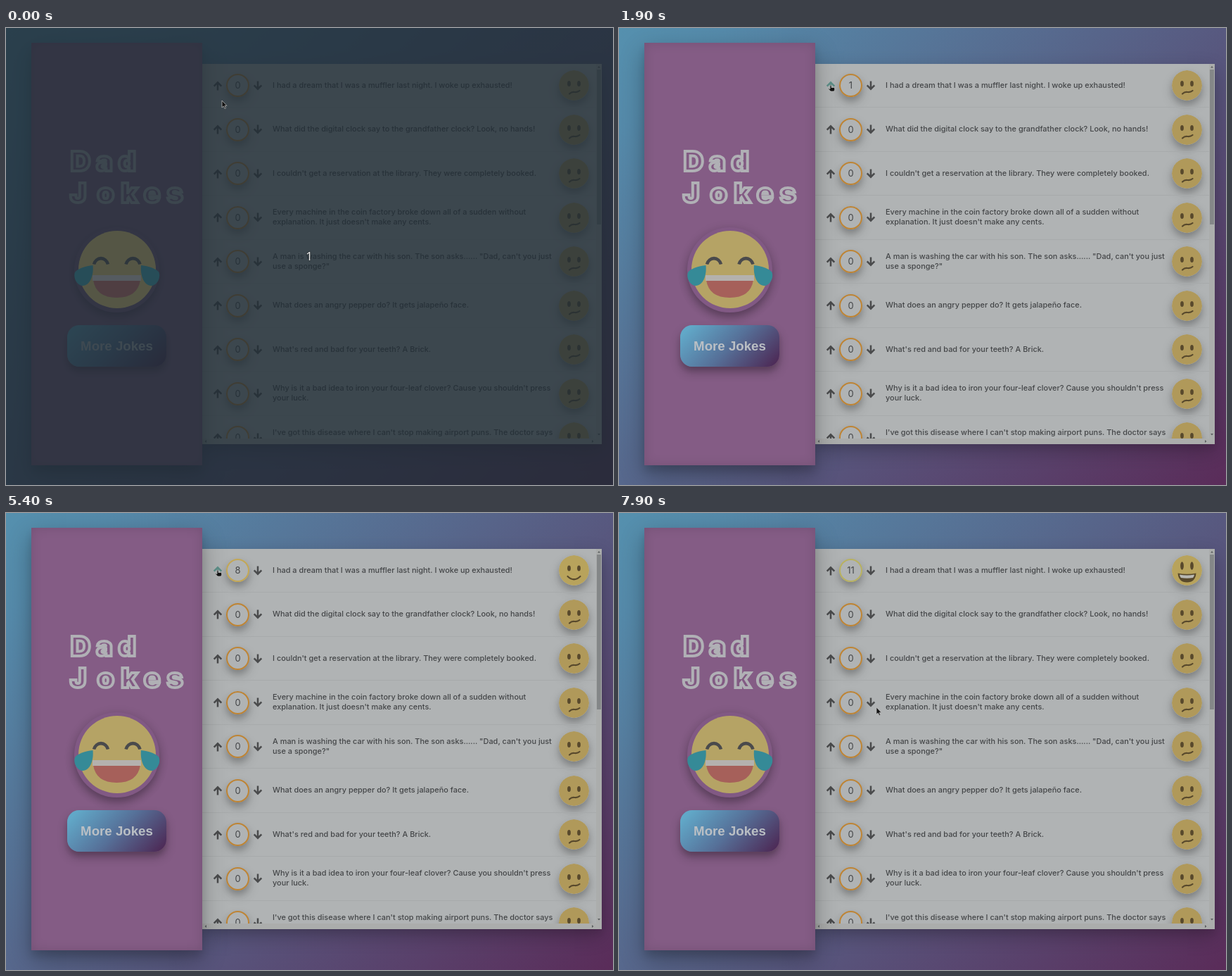
Write an HTML page that moves like this. It is 863 px wide and 649 px high and loops after 8000 ms.

```html
<!DOCTYPE html>
<html lang="en">
<head>
<meta charset="utf-8">
<title>Dad Jokes</title>
<style>
  html, body { margin: 0; width: 100%; height: 100%; overflow: hidden; }
  #stage {
    position: relative; width: 863px; height: 649px; overflow: hidden;
    background: linear-gradient(135deg, #5590ae, #558aaa 10%, #5a2c59);
    font: 500 10.95px/13.7px Inter, sans-serif; color: #444648;
  }
  #stage div, #stage svg { position: absolute; }
  .layer { left: 0; top: 0; width: 863px; height: 649px; }

  #panel {
    left: 279px; top: 51px; width: 568px; height: 540px; background: #abadac;
    box-shadow: 0 10px 26px rgba(0,0,0,.24), 0 6px 8px rgba(0,0,0,.06);
  }
  #list { left: 0; top: 0; width: 560px; height: 532px; overflow: hidden; background: #b0b3b4; }
  .row { left: 0; width: 560px; height: 62.5px; }
  .row::after {
    content: ""; position: absolute; left: 0; right: 0; bottom: 0;
    height: 1px; background: #a7aaab;
  }
  .votes, .face { border-radius: 50%; box-shadow: 0 6px 10px rgba(0,0,0,.2), 0 8px 18px rgba(0,0,0,.12); }
  .votes {
    left: 34px; top: 14.5px; width: 29px; height: 29px; border: 2px solid #be8434;
    font-size: 13px; font-weight: 400; line-height: 29px; text-align: center;
  }
  .icon { top: 24px; width: 14px; height: 14px; fill: none; stroke: #4a4b4c; stroke-width: 2.5; }
  .joke { left: 100px; top: 0; height: 62px; display: flex; align-items: center; white-space: nowrap; }
  .face { left: 507px; top: 9.5px; width: 43px; height: 43px; }
  #thumb { left: 561px; top: 8px; width: 6px; height: 220px; background: #848788; }

  #sidebar {
    left: 36px; top: 21px; width: 243px; height: 600px; background: #845c85;
    box-shadow: 0 13px 32px rgba(0,0,0,.3), 0 8px 10px rgba(0,0,0,.1), inset 0 0 16px rgba(0,0,0,.12);
  }
  #badge {
    left: 97px; top: 283px; width: 121px; height: 121px; border-radius: 50%; background: #815984;
    box-shadow: 0 7px 12px rgba(0,0,0,.25), 0 3px 16px rgba(0,0,0,.12);
  }
  #more {
    left: 87px; top: 422px; width: 141px; height: 59px; border-radius: 17px;
    background: linear-gradient(100deg, #61a8c8, #567199 50%, #4c2350);
    background: linear-gradient(135deg, #61a8c8 8%, #567199 50%, #4c2350);
    box-shadow: 0 8px 14px rgba(0,0,0,.26), 0 5px 6px rgba(0,0,0,.1);
    font: bold 18.7px/59px "Liberation Sans", Arial, sans-serif;
    color: #babfc4; text-align: center;
  }
  #title { font: 900 39px Inter, sans-serif; letter-spacing: 8px; fill: #825a83; stroke: #b0b0b5; stroke-width: 4; }
  #title .wide { letter-spacing: 9.5px; }

  #dim { background: rgba(32,44,53,.8); }
  #count {
    left: 411px; top: 314px; width: 40px; text-align: center; color: #eee;
    font: 500 17px/20px "Noto Sans", sans-serif; text-shadow: 0 0 2px #000;
  }
</style>
</head>
<body>
<div id="stage">
  <div id="panel">
    <div id="list"></div>
    <div id="thumb"></div>
    <svg width="568" height="540" fill="#5c5f60">
      <path d="M562 5.5l2-2.5 2 2.5zM562 525l2 2.5 2-2.5zM6 534l-2.5 2 2.5 2zM554 534l2.5 2-2.5 2z"/>
    </svg>
  </div>
  <div id="sidebar"></div>
  <div id="badge"></div>
  <div id="more">More Jokes</div>
  <svg class="layer">
    <g id="title">
      <text x="92" y="202.500">Dad</text>
      <text x="91" y="247.500">J</text><text x="129.500" y="247.500" class="wide">okes</text>
    </g>
    <g id="joy">
      <circle cx="158" cy="343" r="55" fill="#b5a365"/>
      <path d="M125 335.500a10.500 12 0 0 1 20 0M170.500 335.500a10.500 12 0 0 1 20 0" fill="none" stroke="#4a4a4c" stroke-width="4.600"/>
      <path d="M124 358h67q-4 25-33.500 25t-33.500-25z" fill="#a6605a"/>
      <path d="M123 351h69v8h-69z" fill="#b4b1ae"/>
      <g fill="#358a97">
        <path id="tear" d="M123.500 337C113 338 101 342 98 347C95 356 102 366 109 366C119 366 125 352 123.500 337z"/>
        <use href="#tear" transform="translate(315.5) scale(-1 1)"/>
      </g>
    </g>
  </svg>
  <div id="dim" class="layer">
    <svg class="layer"><use href="#joy" opacity=".2"/></svg>
    <div id="count">1</div>
  </div>
  <svg class="layer">
    <g id="cursor" fill="#111" stroke="#b8b8b8" stroke-width=".8">
      <path id="pointer" d="M0 0V10L2.300 8L4 11.500L5.600 10.700L4 7.400H7z"/>
      <path id="hand" d="M-1 .6Q0-.6 1 .6V3.500H4.500Q5.700 3.700 5.700 5V7L4.500 9H0L-3.300 5.500Q-2.800 4.300-1 5.700z"/>
    </g>
  </svg>
</div>
<script>
const LOOP = 8000;
const jokes = [
  "I had a dream that I was a muffler last night. I woke up exhausted!",
  "What did the digital clock say to the grandfather clock? Look, no hands!",
  "I couldn't get a reservation at the library. They were completely booked.",
  "Every machine in the coin factory broke down all of a sudden without<br>explanation. It just doesn't make any cents.",
  "A man is washing the car with his son. The son asks...... \"Dad, can't you just<br>use a sponge?\"",
  "What does an angry pepper do? It gets jalapeño face.",
  "What's red and bad for your teeth? A Brick.",
  "Why is it a bad idea to iron your four-leaf clover? Cause you shouldn't press<br>your luck.",
  "I've got this disease where I can't stop making airport puns. The doctor says<br>it's terminal."
];

const INK = "#58492c";
const eyes = (y, ry) => [-7, 7].map(x =>
  `<ellipse cx="${x}" cy="${y}" rx="2.4" ry="${ry}" fill="${INK}"/>`).join("");
const line = d => `<path d="${d}" fill="none" stroke="${INK}" stroke-width="2.2" stroke-linecap="round"/>`;
const shape = (d, fill = INK) => `<path d="${d}" fill="${fill}"/>`;

// Each mood applies from its vote count upward.
const moods = [
  { from: 0, ring: "#be8434", skin: "#b0995a", art: eyes(-2.5, 4) + line("M-6.500 12Q-3 8.500 1 9.500Q5 10 8 7.500") },
  { from: 3, ring: "#c0993c", skin: "#b6a05a", art: eyes(-3, 4) + line("M-9 8.500H9") },
  { from: 6, ring: "#c3a755", skin: "#b8a35c", art: eyes(-3, 4) + line("M-9 8.500Q0 17 9 8.500") },
  { from: 9, ring: "#b8b160", skin: "#b8a35c", art: eyes(-6.5, 5.8) +
      shape("M-13 4Q0 6.500 13 4Q12 17 0 17Q-12 17-13 4z") +
      shape("M-10.500 6Q0 8 10.500 6Q10 9.500 8.500 10.500Q0 12-8.500 10.500Q-10 9.500-10.500 6z", "#b9b8b2") }
];
const faceArt = mood => `<circle r="21.5" fill="${mood.skin}"/>` + mood.art;
const arrow = (left, turn) => `<svg class="icon" style="left:${left}px;transform:rotate(${turn}deg)"
  viewBox="-7 -7 14 14"><path d="M0 6.500V-4.500M-5.300 .6L0-4.700L5.300 .6"/></svg>`;

const list = document.getElementById("list");
list.innerHTML = jokes.map((joke, i) => `<div class="row" style="top:${i * 62.5 - 0.5}px">
  ${arrow(15, 0)}<div class="votes">0</div>${arrow(72, 180)}
  <div class="joke"><span>${joke}</span></div>
  <svg class="face" viewBox="-21.5 -21.5 43 43">${faceArt(moods[0])}</svg></div>`).join("");

const [up, votes, face] = [".icon", ".votes", ".face"].map(s => list.querySelector(s));
const [dim, cursor, pointer, hand] =
  ["dim", "cursor", "pointer", "hand"].map(id => document.getElementById(id));

const voteTimes = [1800, 2700, 3400, 3900, 4200, 4800, 5100, 5400, 6300, 6600, 7000];
const path = [[0, 307, 103], [800, 307, 103], [1700, 301, 81], [7100, 301, 81], [7800, 364, 298], [7900, 366, 276]];

function cursorAt(t) {
  const next = path.findIndex(p => p[0] > t);
  if (next < 0) return path[path.length - 1].slice(1);
  const a = path[next - 1], b = path[next], k = (t - a[0]) / (b[0] - a[0]);
  return [a[1] + (b[1] - a[1]) * k, a[2] + (b[2] - a[2]) * k];
}

let shownMood = moods[0];
function render(t) {
  const count = voteTimes.filter(v => v <= t).length;
  const mood = moods.filter(m => m.from <= count).pop();
  votes.textContent = count;
  votes.style.borderColor = mood.ring;
  if (mood !== shownMood) {
    face.innerHTML = faceArt(mood);
    shownMood = mood;
  }
  const [x, y] = cursorAt(Math.floor(t / 100) * 100);
  const hover = y < 90;
  cursor.setAttribute("transform", `translate(${x} ${y})`);
  pointer.style.display = hover ? "none" : "";
  hand.style.display = hover ? "" : "none";
  up.style.stroke = hover ? "#5d8f88" : "";
  dim.style.display = t < 100 ? "" : "none";
}

const start = performance.now();
function tick() {
  render((performance.now() - start) % LOOP);
  requestAnimationFrame(tick);
}
tick();
</script>
</body>
</html>
```
